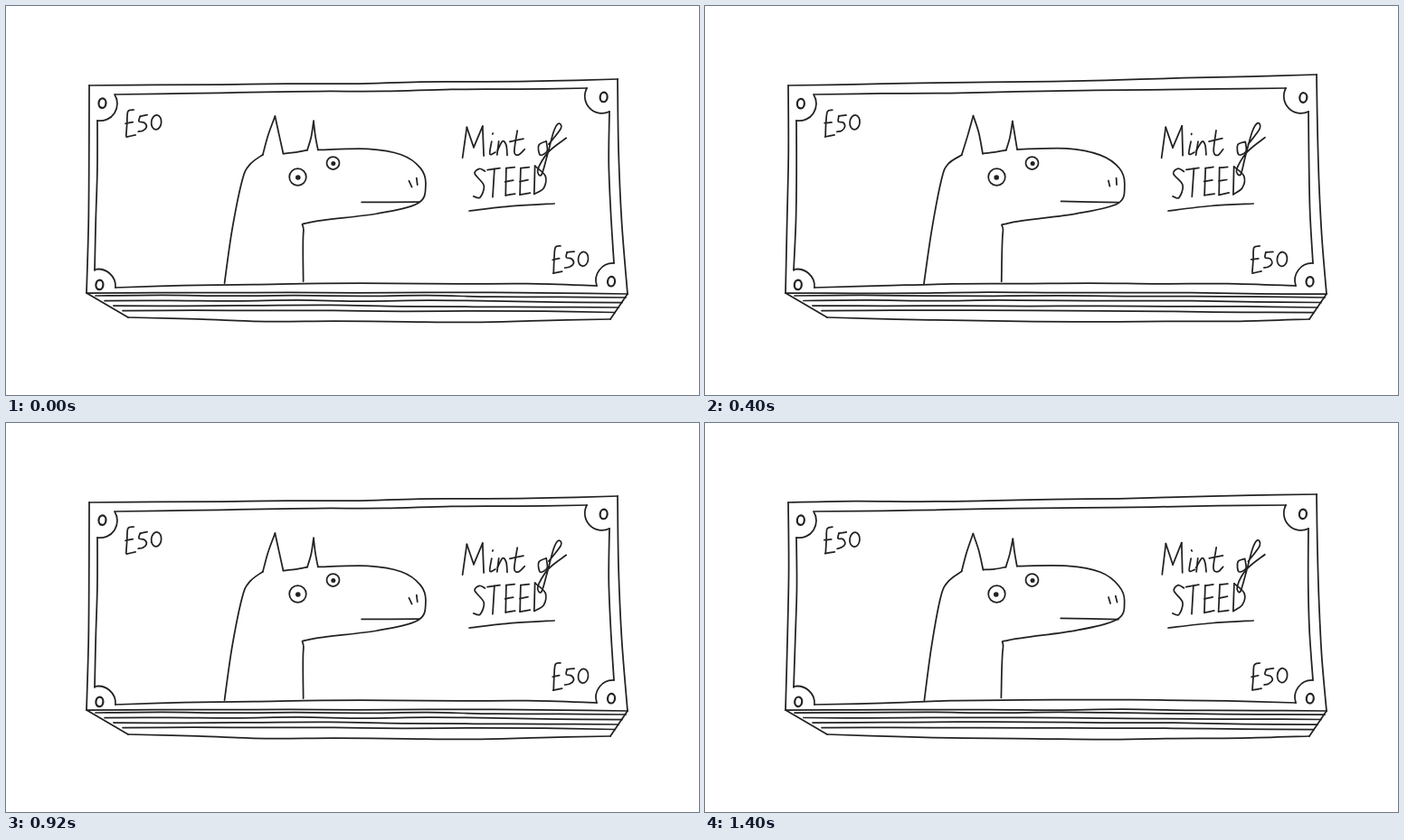
These frames come from a looping animation (766 px wide and 431 px high, 1.44 s). An HTML page:

```html
<!DOCTYPE html>
<html lang="en">
<head>
<meta charset="utf-8">
<title>Fifty pound notes</title>
<style>
  html, body { margin: 0; width: 100%; height: 100%; overflow: hidden; background: #fff; }
  svg { display: block; width: 766px; height: 431px; }
  .ink { fill: none; stroke: #222; stroke-width: 1.75; stroke-linecap: round; stroke-linejoin: round; }
  .bold { stroke-width: 2.2; }
  .dot { fill: #222; stroke: none; }
</style>
</head>
<body>
<svg id="stage" viewBox="0 0 766 431" role="img" aria-label="A stack of £50 notes, Mint of STEED"></svg>
<script>
const LOOP = 1440, TICK = 40, HOLD = 100;
const WINKS = [[40, 160], [440, 520], [1080, 1320]];
const TOP_RIGHT = [81, 76, 79]; // height of the loose corner in each redrawing

// Strokes are "x,y x,y ..." and "/" lifts the pen.
const HORSE = `242,307 250,248 261,193 269,175 284,165 / 284,165 290,143 297,122
  / 297,122 302,141 307,163 / 307,163 320,162 333,160 / 333,160 337,145 340,128
  / 340,128 342,144 345,159
  / 345,159 400,158 437,165 458,180 464,198 456,218 410,230 336,240 329,250 328,305
  / 393,217 457,217 / 446,193 448,200 / 454,191 455,198`;
const POUND = '8,0 2,2 1,15 0,29 / -1,15 7,14 / 0,30 10,28';
const FIVE = '23,6 15,7 / 15,7 14,13 20,14 22,19 18,23 13,24';
const MINT = `505,168 509,134 / 509,134 517,157 / 517,157 527,133 / 527,133 528,166
  / 537,150 535,164 541,162 / 538,141 538,142 / 545,150 543,165
  / 543,160 549,150 553,154 554,165 / 565,138 562,161 567,165 573,159 / 557,150 572,147`;
const OF = `597,150 589,154 590,165 598,161 597,150
  / 600,153 613,136 611,130 605,139 598,165 592,187 588,181 599,162 619,146`;
const GLYPHS = {
  S: '11,3 5,0 0,6 10,19 6,32 -1,31',
  T: '0,2 14,0 / 8,1 6,32',
  E: '10,0 1,1 / 1,1 0,31 / 0,31 11,29 / 0,16 9,14',
  D: '1,0 0,31 / 1,0 12,11 10,24 0,31'
};

let seed = 1;
const random = () => {
  const v = Math.sin(seed++ * 12.9898) * 43758.5453;
  return v - Math.floor(v);
};
const shake = amount => (random() * 2 - 1) * amount;

// Catmull-Rom curve through a list of points.
function curve(p) {
  let d = `M${p[0]}`;
  for (let i = 0; i < p.length - 1; i++) {
    const a = p[i], b = p[i + 1], before = p[i - 1] || a, after = p[i + 2] || b;
    const c1 = a.map((v, k) => v + (b[k] - before[k]) / 6);
    const c2 = b.map((v, k) => v - (after[k] - a[k]) / 6);
    d += `C${c1} ${c2} ${b}`;
  }
  return `<path d="${d}"/>`;
}

// Points that meet keep the same shake, so corners stay closed.
function strokes(text, dx = 0, dy = 0, amount = 0.4) {
  const moved = {};
  const place = key => moved[key] ||= key.split(',').map((v, k) => +v + (k ? dy : dx) + shake(amount));
  return text.split('/').map(s => curve(s.trim().split(/\s+/).map(place))).join('');
}

// A hand-drawn ruler line; bow pushes its middle along x and y.
function line(x1, y1, x2, y2, bowX = 0, bowY = 0) {
  const n = Math.ceil(Math.hypot(x2 - x1, y2 - y1) / 80);
  const points = Array.from({ length: n + 1 }, (_, i) => {
    const u = i / n, arch = 4 * u * (1 - u), wobble = i % n ? 0.7 : 0;
    return [x1 + (x2 - x1) * u + bowX * arch + shake(wobble),
            y1 + (y2 - y1) * u + bowY * arch + shake(wobble)];
  });
  return curve(points);
}

const zero = (x, y, rx, ry, name = '') =>
  `<ellipse class="${name}" cx="${x + shake(0.5)}" cy="${y + shake(0.5)}" rx="${rx}" ry="${ry}" transform="rotate(6 ${x} ${y})"/>`;

const scallop = (x1, y1, x2, y2, sweep, zx, zy) =>
  `<path d="M${x1},${y1}A19,19 0 0 ${sweep} ${x2},${y2}"/>` + zero(zx, zy, 4, 5.3, 'bold');

const eye = (x, y, r, pupil) =>
  `<circle cx="${x}" cy="${y}" r="${r}"/><circle class="dot" cx="${x + shake(0.8)}" cy="${y + 0.5}" r="${pupil}"/>`;

const price = (x, y) => strokes(POUND, x, y) + strokes(FIVE, x, y) + zero(x + 33, y + 14, 5.5, 8);

function note(top) {
  return line(92, 88, 676, top, 0, 1) + line(676, top, 687, 319, -3)
    + line(92, 88, 89, 318, 1) + line(89, 318, 687, 319, 0, -1)
    + line(121, 98, 642, 91) + line(101, 127, 98, 293, 1)
    + line(667, 117, 672, 285, -2) + line(121, 312, 653, 310, 0, -4)
    + scallop(120, 98, 101, 127, 1, 106, 108) + scallop(642, 91, 667, 117, 0, 661, 101)
    + scallop(98, 292, 121, 312, 1, 103, 309) + scallop(672, 285, 653, 310, 0, 669, 305);
}

function stack() {
  let out = line(89, 318, 135, 345, -1, 1) + line(687, 319, 668, 347, 1, 1) + line(135, 345, 668, 347, 0, 4);
  for (let i = 0; i < 4; i++) {
    const y = 321 + 5.5 * i;
    out += line(99 + 10 * i, y, 685 - 4 * i, y + 2, 0, -1);
  }
  return out;
}

function winkingEye() {
  let out = '<path d="M309,187Q323,195 337,185"/>';
  for (let i = -1.5; i < 2; i++) {
    const x = 322.5 + i * 6.4, y = 191 - i * i;
    out += `<path d="M${x},${y}l${i * 1.2},4.5"/>`;
  }
  return out;
}

const title = () => strokes(MINT) + strokes(OF) + line(512, 227, 606, 219, 0, -1)
  + [518, 532, 552, 568, 584].map((x, i) => strokes(GLYPHS['STEED'[i]], x, 180 - i * 0.6)).join('');

function drawing(top) {
  return `<g class="ink pose">${note(top)}${stack()}${strokes(HORSE, 0, 0, 0.7)}${title()}
    ${price(133, 115)}${price(605, 266)}${eye(361.5, 174, 7, 2.5)}
    <g class="open">${eye(322.5, 189.5, 9.3, 2.8)}</g><g class="shut">${winkingEye()}</g></g>`;
}

const stage = document.getElementById('stage');
stage.innerHTML = TOP_RIGHT.map(drawing).join('');
const all = name => [...stage.querySelectorAll(name)];
const poses = all('.pose'), open = all('.open'), shut = all('.shut');
const show = (el, on) => { el.style.display = on ? '' : 'none'; };

function render() {
  const t = Math.floor(performance.now() % LOOP / TICK) * TICK;
  const current = Math.floor(t / HOLD) % poses.length;
  const winking = WINKS.some(([from, to]) => t >= from && t < to);
  poses.forEach((g, i) => show(g, i === current));
  open.forEach(g => show(g, !winking));
  shut.forEach(g => show(g, winking));
  requestAnimationFrame(render);
}
render();
</script>
</body>
</html>
```
